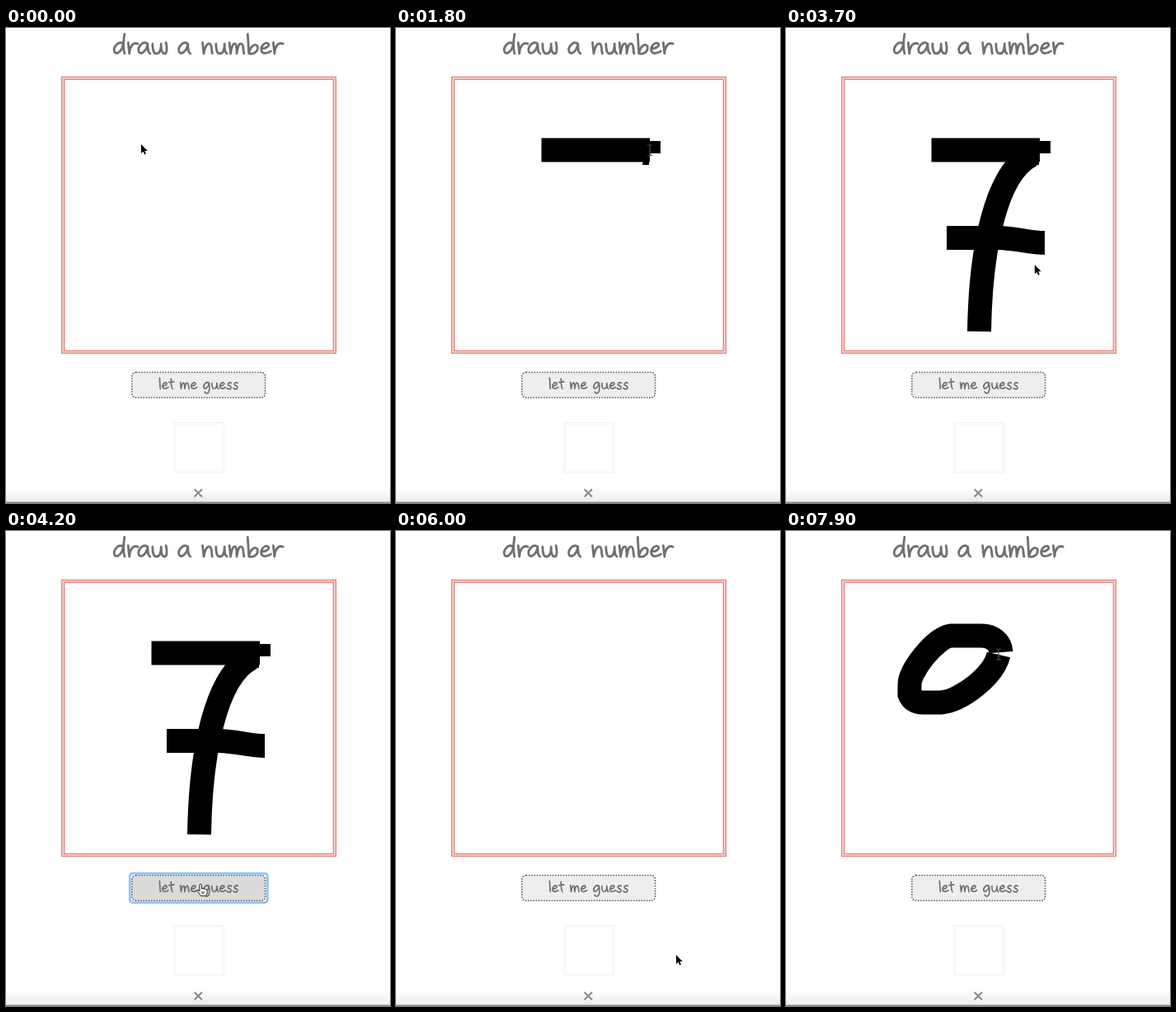
An HTML page for the animation above (8 s loop, 466 by 576 pixels).

```html
<!DOCTYPE html>
<html lang="en">
<head>
<meta charset="utf-8">
<title>draw a number</title>
<style>
  html, body { margin: 0; width: 100%; height: 100%; overflow: hidden; background: #fff; }
  svg { display: block; width: 100vw; height: 100vh; }
  .ink path { fill: none; stroke: #707070; stroke-linecap: round; stroke-linejoin: round; }
  .ink text { fill: transparent; font-family: "Open Sans", sans-serif; }
  .brush { fill: none; stroke: #000; stroke-width: 29; }
</style>
</head>
<body>
<svg viewBox="0 0 466 576">
  <defs>
    <linearGradient id="shade" x1="0" y1="0" x2="0" y2="1">
      <stop offset="0" stop-color="#fff"/>
      <stop offset="1" stop-color="#ececec"/>
    </linearGradient>
  </defs>
  <rect width="466" height="576" fill="#fff"/>
  <rect y="557" width="466" height="18" fill="url(#shade)"/>
  <rect y="574.6" width="466" height="1.4" fill="#858585"/>
  <g fill="none">
    <rect x="69" y="61" width="330" height="332" stroke="#fbe6e3" stroke-width="3"/>
    <g stroke="#e2877e" stroke-width="1.5">
      <rect x="67.7" y="59.5" width="332.6" height="334.8"/>
      <rect x="70.6" y="62.3" width="326.8" height="329.2"/>
    </g>
    <g stroke="#efefef">
      <rect x="204" y="478.5" width="60.5" height="60.5"/>
      <rect x="206" y="480.5" width="56.5" height="56.5" stroke="#f6f6f6"/>
    </g>
    <path d="M228.6 559.2l9.4 9.4m0-9.4l-9.4 9.4" stroke="#8a8a8a" stroke-width="2.1"/>
  </g>
  <rect id="ring" x="150.3" y="415.2" width="167" height="35.4" rx="3.5" fill="#fff" stroke="#8dc4fb" stroke-width="2.8"/>
  <rect id="button" x="152.8" y="417.5" width="161.8" height="30.8" rx="5" stroke="#606060" stroke-width="1.6" stroke-dasharray="1.6 1.6"/>
  <g id="words" class="ink"></g>
  <g id="guess" class="ink"></g>
  <g id="verdict" class="ink"></g>
  <path id="bar" class="brush" d="M176.5 148H308"/>
  <path id="nib" d="M304 137h17v15h-14v14h-8z"/>
  <path id="stem" class="brush" d="M298 154C254 176 236 270 234.5 368"/>
  <path id="cross" class="brush" d="M195 254.5H258C280 255 296 260.5 314 260.5"/>
  <path id="zero" class="brush" d="M261 147C260 134 250 127 237 127H200C180 130 150 170 150 186V198Q154 208 166 208H188C212 206 252 176 258 150"/>
  <g id="cursor">
    <path id="arrow" d="M0 0V11L2.5 8.7 4.3 12.6 6 11.8 4.3 8H7.8z" stroke="#fff" stroke-width="1.4" paint-order="stroke"/>
    <path id="beam" d="M-3-6.5Q0-6.5 0-4.5Q0-6.5 3-6.5M0-5V5M-3 6.5Q0 6.5 0 4.5Q0 6.5 3 6.5M-1.5 2H1.5" fill="none" stroke="#444" stroke-width="1.2"/>
    <path id="hand" d="M-1 8V0Q0-2 1.5 0V5Q3 3.6 4.2 5.2Q5.6 4.2 6.6 5.8Q8.4 5.4 8.2 7.5V10L6.6 13.5H.5L-4 7.6Q-4 5.4-2 6.8zM2 8v3m2-3v3" fill="#fff" stroke="#222"/>
  </g>
</svg>
<script>
const LOOP = 8000, STEP = 100, CLEAR = 5900;
const $ = id => document.getElementById(id);

// Handwritten letters: [advance, path], x-height 10, baseline at 0.
const bowl = "M8-8C4-11-1-5 1-1C3 1 7-2 8-8";
const cup = "M1-8C1-3 2 0 4 0C7 0 8-4 8-8";
const tail = "C8-4 8-1 10 0";
const arch = "L2 0C3-6 5-9 7-8C9-7 8-3 9 0";
const glyphs = {
  " ": [8, ""],
  a: [11, bowl + tail],
  b: [11, "M1-16L2 0C3-6 7-9 9-6C10-2 6 1 2 0"],
  d: [11, bowl + "L9-16C8-10 8-4 9 0"],
  e: [10, "M1-4C5-4 8-6 7-8C5-10 1-7 1-3C2 1 6 0 9-2"],
  g: [11, bowl + "C9-2 9 4 6 6C4 7 2 5 2 4"],
  h: [11, "M1-15" + arch],
  i: [5, "M2-8L3 0M2-12L2-11.5"],
  l: [4, "M1-15L2 0"],
  m: [15, "M1-9L2 0C3-6 4-9 6-8C7-7 7-4 7 0C8-6 9-9 11-8C13-7 12-3 13 0"],
  n: [11, "M1-9" + arch],
  o: [10, "M5-9C1-9 0-3 2-1C5 2 9-3 8-6C8-8 6-9 4-8"],
  r: [9, "M1-9L2 0C2-5 5-10 9-8"],
  s: [9, "M7-8C4-10 1-7 3-5C6-4 8-2 6 0C4 1 2 0 1-1"],
  t: [7, "M3-14C3-8 3-2 5 0M0-9L7-10"],
  u: [11, cup + tail],
  w: [14, cup + "C8-2 9 0 11 0C13 0 13-5 12-9"],
  7: [14, "M1-17C5-18 9-18 13-17C10-11 7-5 6 0"]
};

// Letters are drawn as pen strokes; the selectable text lies over them.
function write(parent, text, x, y, scale, weight) {
  let pen = 0, letters = "";
  for (const ch of text) {
    const [advance, d] = glyphs[ch];
    letters += `<path d="${d}" transform="translate(${pen})"/>`;
    pen += advance;
  }
  $(parent).innerHTML += `<g transform="translate(${x} ${y}) scale(${scale})" stroke-width="${weight / scale}">` +
    `${letters}<text font-size="17">${text}</text></g>`;
}

write("words", "draw a number", 130.5, 31, 1.48, 2.8);
write("words", "let me guess", 185.5, 437.5, 0.87, 1.7);
write("guess", "7", 223.5, 526, 1.5, 2.7);
write("verdict", "wrong", 119, 512, 0.95, 1.6);
write("verdict", "right", 317, 512, 0.95, 1.6);

const linear = u => u;
const slowEnd = u => Math.sin(u * Math.PI / 2);
const smooth = u => u * u * (3 - 2 * u);
const clamp = u => Math.min(1, Math.max(0, u));

const strokes = [
  { id: "bar", from: 1400, to: 1800, ease: linear },
  { id: "stem", from: 1800, to: 2400, ease: slowEnd },
  { id: "cross", from: 3100, to: 3600, ease: linear },
  { id: "zero", from: 7100, to: 7900, ease: linear }
];
for (const s of strokes) s.length = $(s.id).getTotalLength();

// The free pointer glides to each stop: [start, end, x, y].
const home = [164, 141];
const glides = [
  [100, 500, 289, 149],
  [600, 1300, 177, 148],
  [1400, 2400, 235, 368],
  [2400, 3000, 196, 255],
  [3100, 3600, 314, 261],
  [3600, 4000, 236, 429],
  [5100, 5600, 338, 512],
  [5800, 6000, 340, 514],
  [6000, 6700, 216, 113],
  [6700, 7100, 262, 147]
];

function pointer(t) {
  let [x, y] = home;
  for (const [from, to, tx, ty] of glides) {
    const u = smooth(clamp((t - from) / (to - from)));
    x += (tx - x) * u;
    y += (ty - y) * u;
  }
  return [x, y];
}

const show = (id, on) => $(id).setAttribute("visibility", on ? "visible" : "hidden");

function draw(time) {
  const t = Math.floor(time / STEP) * STEP;
  const since = start => t >= start && t < CLEAR;
  let pen = null;
  for (const { id, from, to, ease, length } of strokes) {
    const drawn = length * ease(clamp((t - from) / (to - from)));
    show(id, t > from && (t < CLEAR || from > CLEAR));
    $(id).setAttribute("stroke-dasharray", `${drawn} ${length + 1}`);
    if (t > from && t <= to) {
      const p = $(id).getPointAtLength(drawn);
      pen = [p.x, p.y];
    }
  }
  show("nib", since(1800));
  show("ring", since(4100));
  $("button").setAttribute("fill", since(4000) ? "#dadada" : "#eee");
  show("guess", since(4500));
  show("verdict", since(4800));
  $("verdict").setAttribute("opacity", t < 5000 ? 0.12 : 1);

  const hand = (t >= 4000 && t < 5300) || (t >= 5600 && t < 6000);
  show("beam", pen);
  show("hand", hand);
  show("arrow", !pen && !hand);
  $("cursor").setAttribute("transform", `translate(${pen || pointer(t)})`);
}

function frame() {
  draw(performance.now() % LOOP);
  requestAnimationFrame(frame);
}
frame();
</script>
</body>
</html>
```
